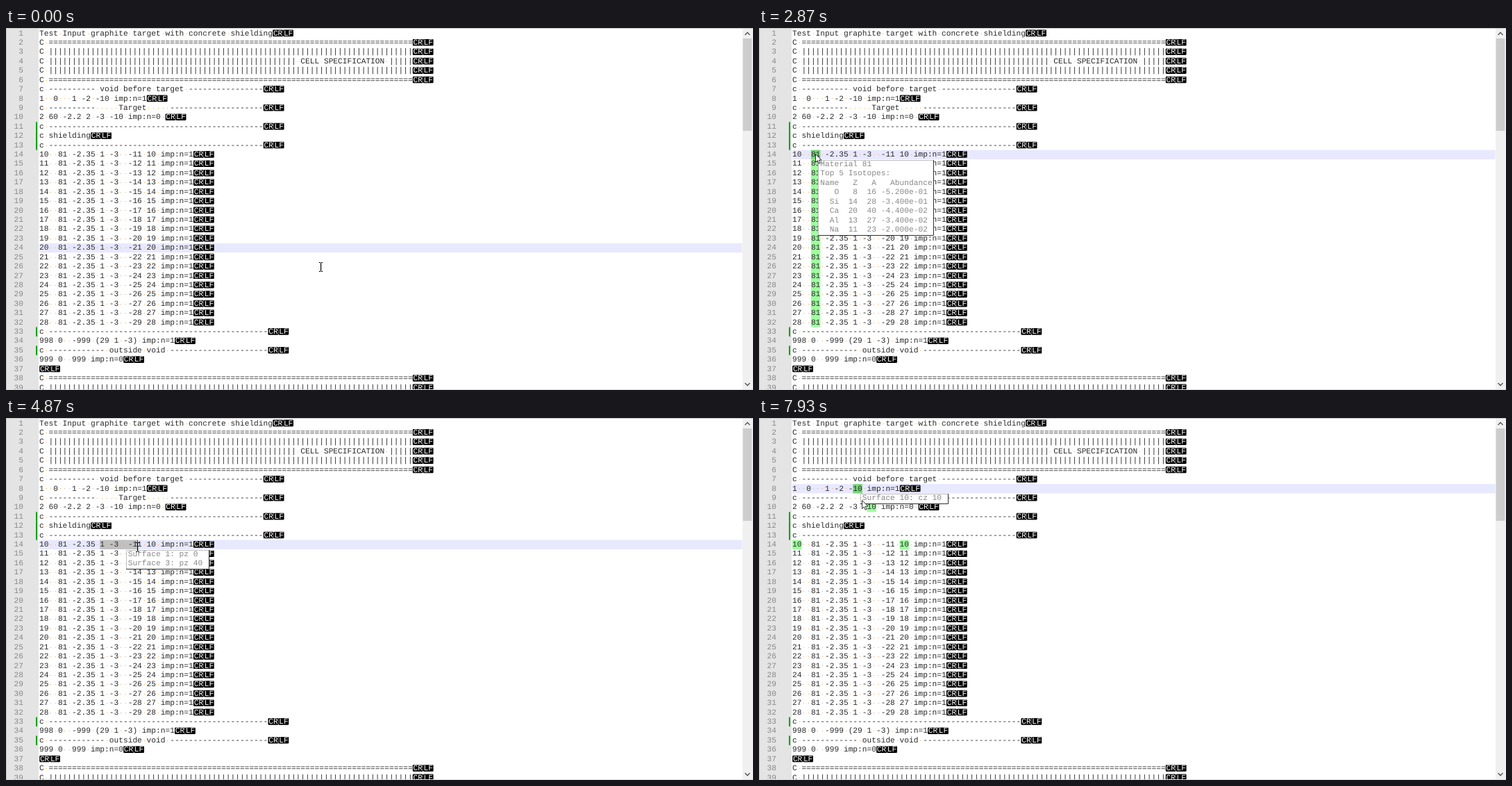
An HTML page with a canvas for the animation above (8 s loop, 1076x521 px).

```html
<!DOCTYPE html>
<html lang="en">
<head>
<meta charset="utf-8">
<title>Input deck editor</title>
<style>
  html, body { margin: 0; width: 100%; height: 100%; overflow: hidden; background: #fff; }
  canvas { display: block; }
</style>
</head>
<body>
<canvas id="stage" width="1076" height="521"></canvas>
<script>
const ctx = document.getElementById('stage').getContext('2d');
const LOOP = 8000, TICK = 1000 / 15, BLINK = 9;
const LEFT = 48, CHAR = 6.72, PITCH = 13.42, BASE = 9.5;
const INK = '#2a2a2a', MUTED = '#888';
const FONT = '11.2px "Liberation Mono", "Courier New", monospace';

const dashes = n => '-'.repeat(n);
const doubleRule = 'C ' + '='.repeat(78);
const bars = 'C ' + '|'.repeat(78);
const rule = 'c ' + dashes(46);
const shells = Array.from({ length: 19 }, (_, i) =>
  `${i + 10}  81 -2.35 1 -3  -${i + 11} ${i + 10} imp:n=1`);

const lines = [
  'Test Input graphite target with concrete shielding',
  doubleRule,
  bars,
  'C ' + '|'.repeat(53) + ' CELL SPECIFICATION |||||',
  bars,
  doubleRule,
  `c ${dashes(10)} void before target ${dashes(16)}`,
  '1  0   1 -2 -10 imp:n=1',
  `c ${dashes(10)}     Target     ${dashes(20)}`,
  '2 60 -2.2 2 -3 -10 imp:n=0 ',
  rule,
  'c shielding',
  rule,
  ...shells,
  rule + '-',
  '998 0  -999 (29 1 -3) imp:n=1',
  `c ${dashes(12)} outside void ${dashes(21)}`,
  '999 0  999 imp:n=0',
  '',
  doubleRule,
  bars
];
const editedLines = [11, 12, 13, 33, 35];

const material = [
  'Material 81',
  'Top 5 Isotopes:',
  'Name   Z   A   Abundance',
  '   O   8  16 -5.200e-01',
  '  Si  14  28 -3.400e-01',
  '  Ca  20  40 -4.400e-02',
  '  Al  13  27 -3.400e-02',
  '  Na  11  23 -2.000e-02'
];
const surfaces = { 1: 'pz 0', 10: 'cz 10', 11: 'cz 20', 3: 'pz 40' };

// Pointer path: tick, x, y
const path = [
  [0, 453, 344], [9, 453, 344], [22, 82, 175], [23, 82, 175], [27, 83, 182],
  [33, 83, 182], [34, 81, 181], [45, 81, 181], [54, 125, 178], [58, 133, 184],
  [59, 140, 189], [60, 140, 189], [63, 138, 188], [66, 138, 188], [78, 219, 185],
  [81, 219, 185], [83, 220.5, 185], [84, 220.5, 185], [85, 222, 185], [90, 222, 185],
  [97, 145.5, 104], [103, 145.5, 104], [104, 142, 102], [118, 142, 102],
  [119, 147.5, 118], [120, 147.5, 118]
];

function pointerAt(tick) {
  const i = Math.max(1, path.findIndex(p => p[0] >= tick));
  const [t0, x0, y0] = path[i - 1], [t1, x1, y1] = path[i];
  const u = (tick - t0) / (t1 - t0), s = u * u * (3 - 2 * u);
  return { x: x0 + (x1 - x0) * s, y: y0 + (y1 - y0) * s };
}

function editorAt(tick) {
  const at = (line, anchor, caret = anchor) => ({ line, anchor, caret });
  if (tick < 31) return at(24, 33);
  if (tick < 34) return at(14, 5);
  if (tick < 58) return at(14, 4, 6);
  if (tick < 67) return at(14, 13);
  if (tick < 101) {
    const dragged = pointerAt(Math.min(tick, 78)).x;
    return at(14, 13, Math.round((dragged - LEFT) / CHAR));
  }
  return tick < 104 ? at(8, 14) : at(8, 13, 15);
}

const selectedText = s => lines[s.line - 1].slice(s.anchor, s.caret);
const colX = col => LEFT + col * CHAR;
const lineY = line => 1.1 + (line - 1) * PITCH;

function caretVisible(tick) {
  const now = editorAt(tick);
  const same = t => {
    const s = editorAt(t);
    return s.line === now.line && s.caret === now.caret;
  };
  let since = tick;
  while (since > -15 && same(since - 1)) since--;
  return Math.floor((tick - since) / BLINK) % 2 === 0;
}

function rect(color, x, y, w, h) {
  ctx.fillStyle = color;
  ctx.fillRect(x, y, w, h);
}

function drawText(text, x, y, color) {
  ctx.fillStyle = color;
  [...text].forEach((c, i) => c !== ' ' && ctx.fillText(c, x + i * CHAR, y));
}

function stroke(color, width, points) {
  ctx.strokeStyle = color;
  ctx.lineWidth = width;
  ctx.beginPath();
  points.forEach(([x, y]) => ctx.lineTo(x, y));
  ctx.stroke();
}

function drawLineEnd(col, y) {
  ['CR', 'LF'].forEach((label, i) => {
    const x = colX(col) + i * 15;
    ctx.fillStyle = '#000';
    ctx.beginPath();
    ctx.roundRect(x + 0.2, y + 1.5, 14.8, 9.6, 1.2);
    ctx.fill();
    drawText(label, x + 0.9, y + BASE, '#fff');
  });
}

function drawLines() {
  lines.forEach((text, i) => {
    const y = lineY(i + 1), number = String(i + 1);
    drawText(number, 25 - number.length * CHAR, y + BASE, MUTED);
    [...text].forEach((c, col) => {
      if (c === ' ') rect('#ffa550', Math.round(colX(col) + 2.8), Math.round(y + 6.4), 1, 1);
    });
    drawText(text, LEFT, y + BASE, INK);
    drawLineEnd(text.length, y);
  });
}

function drawMargin() {
  rect('#e4e4e4', 0, 0, 47, 521);
  editedLines.forEach(n => rect('#00a000', 43, lineY(n), 2, PITCH));
}

function drawScrollbar() {
  rect('#f0f0f0', 1061, 0, 15, 521);
  rect('#cdcdcd', 1061.5, 15, 12.8, 133);
  stroke('#505050', 1.3, [[1064.5, 10], [1068, 6.5], [1071.5, 10]]);
  stroke('#505050', 1.3, [[1064.5, 511], [1068, 514.5], [1071.5, 511]]);
}

function drawMatches(word) {
  lines.forEach((text, i) => {
    for (const m of text.matchAll(new RegExp(`\\b${word}\\b`, 'g'))) {
      rect('rgba(0,255,0,.39)', colX(m.index), lineY(i + 1), word.length * CHAR, PITCH);
    }
  });
}

function tipRows(text) {
  if (text === '81') return material;
  const ids = [...new Set(text.match(/\d+/g))].filter(id => surfaces[id]).sort();
  return ids.map(id => `Surface ${id}: ${surfaces[id]} `);
}

function drawTip(state) {
  const rows = tipRows(selectedText(state));
  if (!rows.length) return;
  const top = lineY(state.line + 1);
  const x = Math.round(colX(state.caret)) - 3, y = Math.round(top + 0.9);
  const w = Math.round(Math.max(...rows.map(r => r.length)) * CHAR + 6);
  const h = Math.round(rows.length * PITCH + 1.5);
  rect('#fff', x, y, w, h);
  stroke('#c0c0c0', 1, [[x + 0.5, y + h], [x + 0.5, y + 0.5], [x + w, y + 0.5]]);
  stroke('#303030', 1, [[x, y + h - 0.5], [x + w - 0.5, y + h - 0.5], [x + w - 0.5, y]]);
  rows.forEach((r, i) => drawText(r, colX(state.caret), top + BASE + 0.5 + i * PITCH, MUTED));
}

function drawPointer(tick) {
  const { x, y } = pointerAt(tick);
  ctx.save();
  ctx.translate(Math.round(x), Math.round(y));
  if ((tick >= 34 && tick < 49) || tick >= 104) {
    const arrow = new Path2D('M.5 .5V12.5L3.3 9.8 5.2 14.2 7.2 13.3 5.3 9.1H9Z');
    ctx.fillStyle = '#fff';
    ctx.fill(arrow);
    ctx.strokeStyle = '#000';
    ctx.lineWidth = 0.8;
    ctx.stroke(arrow);
  } else {
    rect('#000', 0, -6, 1.2, 12);
    for (const end of [-7, 6]) {
      rect('#000', -2, end, 2, 1);
      rect('#000', 1.2, end, 2, 1);
    }
  }
  ctx.restore();
}

function draw(tick) {
  const state = editorAt(tick), y = lineY(state.line);
  const selected = selectedText(state);
  rect('#fff', 0, 0, 1076, 521);
  drawMargin();
  rect('#e8e8ff', 48, y, 1012.5, PITCH);
  rect('#c0c0c0', colX(state.anchor), y, selected.length * CHAR, PITCH);

  // Matches and tips follow the selection one tick later
  const settled = editorAt(tick - 1);
  const word = selected && selectedText(settled);
  if (/^\w+$/.test(word)) drawMatches(word);
  drawLines();
  if (caretVisible(tick)) rect('#8000ff', Math.floor(colX(state.caret)), y, 1, PITCH);
  if (word) drawTip(settled);

  drawScrollbar();
  rect('#c4c4c4', 0, 0, 1076, 1);
  rect('#c4c4c4', 0, 0, 1, 521);
  rect('#d8d8d8', 0, 520, 1076, 1);
  drawPointer(tick);
}

ctx.font = FONT;
ctx.textRendering = 'geometricPrecision';
const start = performance.now();
function frame() {
  const time = (performance.now() - start) % LOOP;
  draw(Math.floor((time + 5) / TICK) % 120);
  requestAnimationFrame(frame);
}
frame();
</script>
</body>
</html>
```
